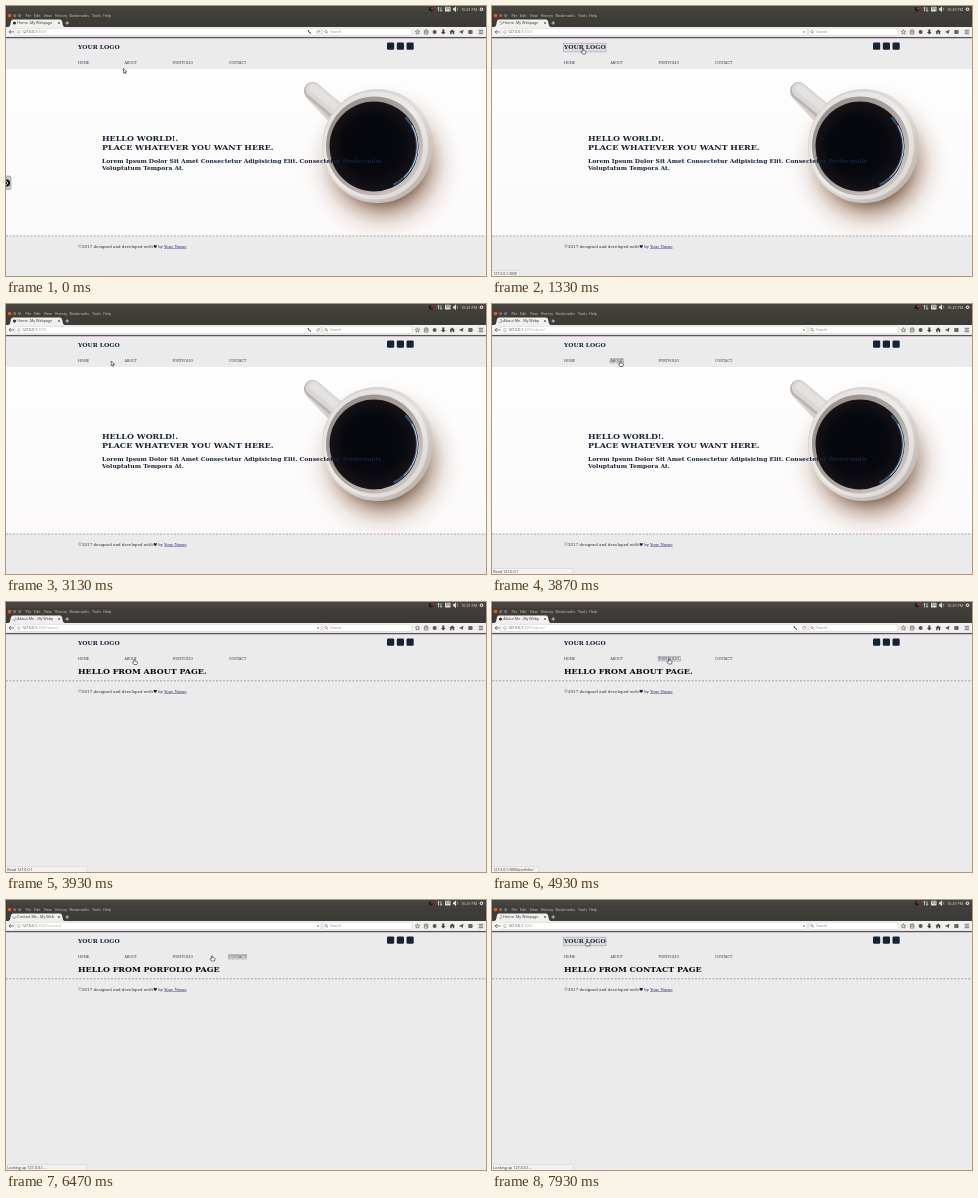
An HTML page with a canvas that plays this animation: 480x270 px, repeating every 8 s.

```html
<!DOCTYPE html>
<html lang="en">
<head>
<meta charset="utf-8">
<title>Home - My Webpage</title>
<style>
  html, body { margin: 0; width: 100%; height: 100%; overflow: hidden; }
  canvas { display: block; width: 480px; height: 270px; }
</style>
</head>
<body>
<canvas id="stage" width="480" height="270"></canvas>
<script>
const ctx = document.getElementById('stage').getContext('2d');
const LOOP = 8000;
const SERIF = '"DejaVu Serif", serif';
const SANS = '"Open Sans", "Noto Sans", sans-serif';
const NAVY = '#182236', PAGE = '#ebebec';
const HOST = '127.0.0.1', LOOKUP = 'Looking up 127.0.0.1…';
const TITLES = {
  home: 'Home -My Webpage', about: 'About Me - My Webp',
  portfolio: 'Portfolio - My Webp', contact: 'Contact Me - My Web'
};
const HEADINGS = {
  about: 'HELLO FROM ABOUT PAGE.', portfolio: 'HELLO FROM PORFOLIO PAGE', contact: 'HELLO FROM CONTACT PAGE'
};
const LINKS = {
  logo: [71.5, 37.3, 42.5, 8.5], home: [71.5, 54.5, 12, 4.5], about: [118, 54.5, 13.5, 4.5],
  portfolio: [166, 54.5, 22.5, 4.5], contact: [222.5, 54.5, 18, 4.5]
};

// Each step changes only the listed parts of the browser state.
const START = { page: 'home', site: 'home', title: TITLES.home, status: '', focus: '', spin: '' };
const hover = path => ({ status: HOST + ':3000' + path });
const connect = { spin: 'grey' };
const receive = (site, status = LOOKUP, spin = 'grey') => ({ site, title: TITLES[site], status, spin });
const show = page => ({ page, focus: '', status: 'Read ' + HOST, spin: 'blue' });
const done = { spin: '', status: '' };
const STEPS = [
  [400, hover('')], [1200, { focus: 'logo' }], [1330, connect], [1470, receive('home')],
  [1670, show('home')], [1870, hover('')], [2130, { spin: '' }],
  [2330, { focus: 'home' }], [2530, connect], [2670, receive('home')], [2870, show('home')], [3070, done],
  [3400, hover('/about/')], [3600, { focus: 'about' }], [3670, connect],
  [3800, receive('about', 'Read ' + HOST, 'blue')], [3930, show('about')], [4130, done],
  [4670, hover('/portfolio/')], [4870, { focus: 'portfolio' }], [5130, connect],
  [5330, receive('portfolio')], [5470, show('portfolio')], [5670, done],
  [5900, hover('/contact/')], [6200, { focus: 'contact' }], [6270, connect],
  [6400, receive('contact')], [6530, show('contact')], [6730, done],
  [7270, hover('')], [7530, { focus: 'logo' }], [7670, connect], [7830, receive('home')]
];
const POINTER = [
  [70, 117.5, 62.5], [200, 109, 42], [400, 109, 42], [900, 91, 43], [1530, 91, 43], [1900, 80, 57],
  [2870, 80, 57], [3330, 122, 57], [3600, 128.5, 57.5], [4270, 128.5, 57.5], [4800, 177, 57],
  [5530, 177, 57], [5930, 224, 57], [6000, 229, 57], [6400, 229, 57], [6470, 206, 56],
  [7000, 125, 62.5], [7070, 112, 51], [7130, 99.5, 42], [7270, 99.5, 42], [7530, 95, 41]
];
const ARROW = 'M0 0V4.6L1.1 3.6 1.9 5.3 2.7 4.9 1.9 3.3H3.3Z';
const HAND = 'M-.6 0Q0-.9.6 0V1.6L2.6 2.1Q3.2 2.4 3 3.2L2.4 5H-.6L-2.1 2.9Q-1.9 1.9-.6 2.7Z';

function text(str, x, y, size, color, font = SERIF, weight = '') {
  ctx.save();
  ctx.translate(x, y);
  ctx.scale(.25, .25);
  ctx.font = `${weight} ${size * 4}px ${font}`;
  ctx.fillStyle = color;
  ctx.fillText(str, 0, 0);
  const width = ctx.measureText(str).width / 4;
  ctx.restore();
  return width;
}
const bold = (str, x, y, size, color = NAVY) => text(str, x, y, size, color, SERIF, 'bold');
const ui = (str, x, y, color = '#444', size = 3.7) => text(str, x, y, size, color, SANS);

function box(x, y, w, h, fill, radius = 0, edge) {
  ctx.beginPath();
  ctx.roundRect(x, y, w, h, radius);
  ctx.fillStyle = fill;
  ctx.fill();
  if (edge) { ctx.strokeStyle = edge; ctx.lineWidth = .5; ctx.stroke(); }
}
function oval(x, y, rx, ry, fill) {
  ctx.beginPath();
  ctx.ellipse(x, y, rx, ry, 0, 0, 7);
  ctx.fillStyle = fill;
  ctx.fill();
}
function line(d, color, width = .7, x = 0, y = 0) {
  ctx.save();
  ctx.translate(x, y);
  ctx.strokeStyle = color;
  ctx.lineWidth = width;
  ctx.stroke(new Path2D(d));
  ctx.restore();
}
function shape(d, color, x = 0, y = 0) {
  ctx.save();
  ctx.translate(x, y);
  ctx.fillStyle = color;
  ctx.fill(new Path2D(d));
  ctx.restore();
}
function arc(x, y, r, from, to, color, width) {
  ctx.beginPath();
  ctx.arc(x, y, r, from, to);
  ctx.strokeStyle = color;
  ctx.lineWidth = width;
  ctx.stroke();
}
function blend(gradient, ...stops) {
  stops.forEach((color, i) => gradient.addColorStop(i / (stops.length - 1), color));
  return gradient;
}

function browser(state, t) {
  box(0, 0, 480, 21, blend(ctx.createLinearGradient(0, 0, 0, 21), '#4a4741', '#3f3d38', '#3b3a36'));
  box(0, 6.4, 480, .4, '#302f2c');
  oval(3.6, 9.6, 1.8, 1.8, '#e2592c');
  oval(8.7, 9.6, 1.6, 1.6, '#77746c');
  oval(13.6, 9.6, 1.6, 1.6, '#77746c');
  [['File', 19.5], ['Edit', 28], ['View', 37.7], ['History', 48.7], ['Bookmarks', 63.5], ['Tools', 86], ['Help', 97]]
    .forEach(([name, x]) => ui(name, x, 11, '#d0ccc3'));

  oval(425, 3.2, 2.2, 2.2, '#1d1c1a');
  oval(426, 2.6, 1, 1, '#d33');
  line('M0 5V1M-1 2L0 1 1 2M2.5 1V5M1.5 4L2.5 5 3.5 4', '#ddd', .8, 432.5, .3);
  box(439, .8, 5.5, 4.8, '#dedbd4', .7);
  ui('EN', 439.8, 4.4, '#3c3b37', 3);
  shape('M0 2H1L3 0V6L1 4H0Z', '#ddd', 447, .2);
  line('M0 1Q1.5 2.5 0 4', '#ddd', .5, 451, .7);
  ui('10:29 PM', 455, 4.6, '#dfdbd2');
  oval(475.5, 3.2, 1.8, 1.8, '#ddd');
  oval(475.5, 3.2, .8, .8, '#45433e');

  box(0, 21, 480, 9.8, '#f1f0ef');
  shape('M2 21Q4 21 4.5 17.5 5 13.6 7 13.6H54Q56 13.6 56.5 17.5 57 21 59 21Z', '#f1f0ef');
  if (state.spin) arc(8.5, 17, 1.5, t / 130, t / 130 + 4.2, state.spin === 'blue' ? '#2f8fd0' : '#888', .8);
  else oval(8.5, 17, 1.6, 1.6, '#333');
  ctx.save();
  ctx.beginPath();
  ctx.rect(11, 13, 38.5, 7);
  ctx.clip();
  ui(state.title, 11.3, 18.3, '#333');
  ctx.restore();
  line('M0 0L2 2M2 0L0 2', '#444', .6, 52, 16);
  line('M0 1.7H3.4M1.7 0V3.4', '#ddd', .8, 59.5, 15.3);

  box(9, 22.3, 306, 7.2, '#fff', 1, '#c9c7c3');
  oval(5, 25.9, 3.6, 3.6, '#fafafa');
  line('M3 0H-2M0-2L-2 0 0 2', '#555', .8, 5, 25.9);
  line('M0-1.6A1.6 1.6 0 1 0 .1-1.6M0-.3V1', '#888', .5, 12.7, 26);
  const width = ui(HOST, 16, 27.3, '#333', 3.6);
  ui(':3000' + (state.site === 'home' ? '' : `/${state.site}/`), 16 + width, 27.3, '#aaa', 3.6);
  if (state.spin) {
    line('M0 0L2 2M2 0L0 2', '#888', .6, 311, 25);
  } else {
    line('M0 0Q.5 2.5 3 3.5', '#333', 1.1, 302, 24);
    line('M1.2-.8A1.4 1.4 0 1 0 1.4.6M1.5-1.6V-.5H.4', '#777', .6, 312, 26);
  }
  box(317, 22.3, 89, 7.2, '#fff', 1, '#c9c7c3');
  line('M1.2 0A1.2 1.2 0 1 0 1.2 .1M.8 .9L2 2', '#666', .6, 320, 25.5);
  ui('Search', 324, 27.3, '#888', 3.6);
  line('M0-2.3L.7-.7 2.3-.6 1.1.5 1.5 2.1 0 1.2-1.5 2.1-1.1.5-2.3-.6-.7-.7Z', '#555', .6, 411.5, 26);
  box(418.3, 24.2, 3.6, 4, '#f1f0ef', .4, '#444');
  line('M1 0H3M0 1.6H4M0 2.8H4', '#555', .5, 418.2, 24);
  oval(428.6, 26, 2, 2, '#555');
  shape('M1-2.5V0H2.4L0 2.5-2.4 0H-1V-2.5Z', '#444', 437.3, 26);
  shape('M0-2.6L2.8 0H2V2.3H.6V.6H-.6V2.3H-2V0H-2.8Z', '#444', 446.2, 26);
  shape('M-2.4 0L2.4-2.3 1.3 2.3 0 .8Z', '#555', 455.2, 26);
  box(462.2, 24, 4.4, 4, '#666', 1);
  line('M0 0H4.4M0 1.7H4.4M0 3.4H4.4', '#444', .7, 472.7, 24.3);
}

function cup() {
  box(0, 63, 480, 167, blend(ctx.createLinearGradient(0, 63, 0, 230), '#fefefe', '#fdfcfd', '#fbf9f9'));
  ctx.save();
  ctx.beginPath();
  ctx.rect(0, 63, 480, 167);
  ctx.clip();
  oval(377, 157, 88, 88, blend(ctx.createRadialGradient(377, 157, 40, 377, 157, 88),
    'rgba(120,88,66,.8)', 'rgba(165,135,114,.5)', 'rgba(205,184,170,.26)', 'rgba(232,220,212,.1)', 'rgba(255,255,255,0)'));

  ctx.lineCap = 'round';
  line('M307 86L334 114', 'rgba(150,130,120,.35)', 18);
  line('M306.5 84.5L336 110', '#bbb5b2', 17);
  line('M307 83.7L337 108', '#dad7d5', 14.5);
  line('M307.5 82.5L334 104', '#e4e2e0', 8);
  ctx.lineCap = 'butt';

  oval(371.5, 140, 55.5, 57, blend(ctx.createLinearGradient(330, 95, 412, 187), '#d3d0ce', '#e2dfdd', '#bdb3ac'));
  oval(369.5, 139.5, 52.5, 54, blend(ctx.createLinearGradient(330, 95, 410, 185), '#e3e1df', '#eeecea', '#dcd7d3'));
  oval(368.5, 140, 48.5, 49.5, blend(ctx.createLinearGradient(325, 100, 412, 178), '#958e89', '#aaa39e', '#cfc9c5'));
  oval(368, 140.5, 44.5, 45, blend(ctx.createRadialGradient(364, 138, 15, 368, 140.5, 45), '#05070c', '#07090f', '#171317'));
  arc(368, 140.5, 43, -.75, 1.1, 'rgba(75,125,175,.6)', 2.2);
  arc(368, 140.5, 43.4, -.5, .8, 'rgba(225,235,245,.85)', 1);
  ctx.restore();
}

function footer(y) {
  ctx.save();
  ctx.setLineDash([2, 1.5]);
  line(`M0 ${y}H480`, '#888', .7);
  ctx.restore();
  const base = y + 11.9;
  text('©2017 designed and developed with', 72, base, 4, '#262b36');
  shape('M0 1.7L-1.6 0Q-2.1-1.5-.9-1.6-.2-1.6 0-.9.2-1.6.9-1.6 2.1-1.5 1.6 0Z', NAVY, 149.2, base - 1.3);
  text('by', 152.3, base, 4, '#262b36');
  const width = text('Your Name', 158, base, 4, '#302670');
  box(158, base + .6, width, .4, '#302670');
}

function webpage(state) {
  box(0, 30.8, 480, 239.2, PAGE);
  box(0, 30.8, 480, 1.4, '#6d426c');
  bold('YOUR LOGO', 72, 43.1, 6);
  [381, 390.8, 400.5].forEach(x => box(x, 36.6, 7.2, 7.2, NAVY, 1.2));
  for (const [name, area] of Object.entries(LINKS)) {
    if (name === state.focus) {
      ctx.save();
      ctx.setLineDash([.75, .5]);
      box(...area, 'rgba(90,95,110,.1)', 0, '#555b68');
      ctx.restore();
    }
    if (name !== 'logo') text(name.toUpperCase(), area[0] + .4, 57.9, 3.3, '#2b3446');
  }
  if (state.page === 'home') {
    cup();
    bold('HELLO WORLD!.', 96, 135, 8);
    bold('PLACE WHATEVER YOU WANT HERE.', 96, 144, 8);
    bold('Lorem Ipsum Dolor Sit Amet Consectetur Adipisicing Elit. Consectetur Perferendis', 96, 157, 6);
    bold('Voluptatum Tempora At.', 96, 164, 6);
    footer(230);
  } else {
    bold(HEADINGS[state.page], 72, 71.8, 8, '#080808');
    footer(78.8);
  }
}

function statusBar({ status }) {
  if (!status) return;
  const wide = !status.startsWith(HOST);
  box(-1, 264.5, wide ? 82 : status.length * 1.75 + 4, 7, '#f3f2f1', .8, '#cfcdca');
  ui(status, 1.3, 268.8, '#333', wide ? 3.7 : 3.5);
}

function pointer(t) {
  const next = POINTER.findIndex(key => key[0] > t);
  const b = POINTER.at(next), a = next < 0 ? b : POINTER[Math.max(next - 1, 0)];
  const k = a === b ? 0 : (t - a[0]) / (b[0] - a[0]), ease = k * k * (3 - 2 * k);
  const x = a[1] + (b[1] - a[1]) * ease, y = a[2] + (b[2] - a[2]) * ease;
  const onLink = Object.values(LINKS).some(([l, top, w, h]) => x >= l && x <= l + w && y >= top && y <= top + h);
  // The hand lingers briefly after the pointer leaves a busy page's link.
  const cursor = onLink || (t > 6400 && t < 6530) ? HAND : ARROW;
  shape(cursor, '#fff', x, y);
  line(cursor, '#222', .6, x, y);
}

function draw() {
  const t = performance.now() % LOOP;
  const state = Object.assign({}, START, ...STEPS.filter(step => step[0] <= t).map(step => step[1]));
  ctx.clearRect(0, 0, 480, 270);
  webpage(state);
  browser(state, t);
  statusBar(state);
  if (t < 130) {
    box(-2, 170, 7, 13.5, '#c9c9c9', 1.5, '#777');
    oval(1, 177, 3, 3.5, '#111');
    line('M0 0L2 2 0 4', '#fff', .8, 0, 175);
  }
  pointer(t);
  requestAnimationFrame(draw);
}
draw();
</script>
</body>
</html>
```
